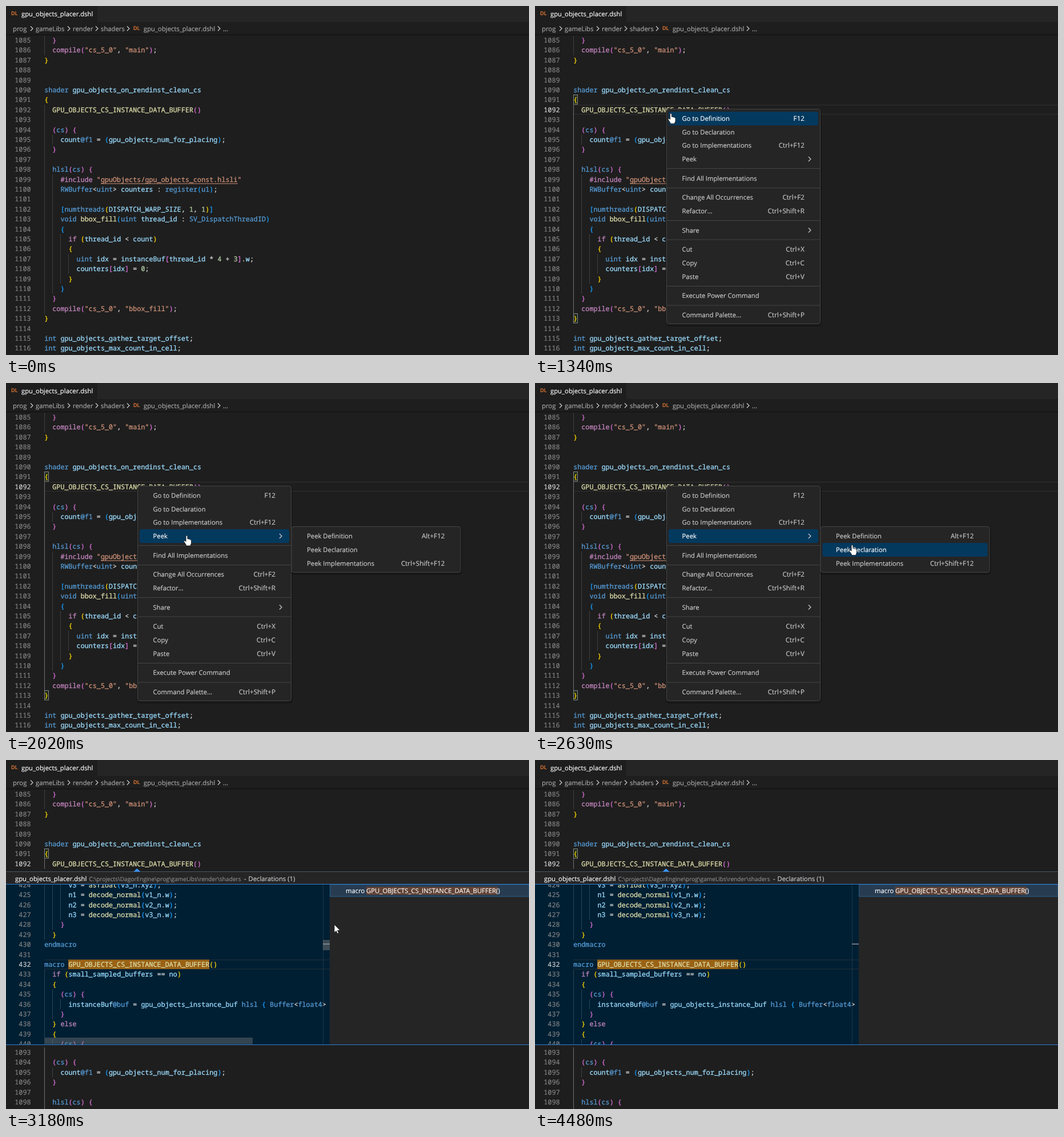
An HTML page that plays this animation: 916 by 611 pixels, repeating every 5210 ms.

```html
<!DOCTYPE html>
<html lang="en">
<head>
<meta charset="utf-8">
<title>Peek declaration</title>
<style>
  html, body { margin: 0; width: 100%; height: 100%; overflow: hidden; background: #1e1e1e; }
  svg { display: block; width: 100vw; height: 100vh; }
  text, tspan { fill: currentColor; stroke: currentColor; }
  text { white-space: pre; text-rendering: geometricPrecision; }
  .code { font: 11.757px "Noto Sans Mono", monospace; color: #d4d4d4; stroke-width: .3; }
  .ui { font: 11.3px "Open Sans", sans-serif; color: #ccc; stroke-width: .15; }
  .num { color: #858585; text-anchor: end; stroke-width: .15; }
  .key { font-size: 11.7px; text-anchor: end; }
  .white { color: #fff; }
  .crumb { color: #a9a9a9; }
  .path { font-size: 10.14px; color: #8f8f8f; }
  .lang { font-size: 9px; font-weight: 600; color: #e37933; }
  .symbol { font-size: 11.33px; color: #fff; }
  .chev { fill: none; stroke: #ccc; stroke-width: 1.2; }
  .guide { shape-rendering: crispEdges; }
</style>
</head>
<body>
<svg id="stage" viewBox="0 0 916 611"></svg>
<script>
const LOOP = 5210, TICK = 67.4;
const CHAR = 7.054, ROW = 17.4, LEFT = 67.2;

const main = `  }
  compile("cs_5_0", "main");
}


shader gpu_objects_on_rendinst_clean_cs
{
  GPU_OBJECTS_CS_INSTANCE_DATA_BUFFER()

  (cs) {
    count@f1 = (gpu_objects_num_for_placing);
  }

  hlsl(cs) {
    #include "gpuObjects/gpu_objects_const.hlsli"
    RWBuffer<uint> counters : register(u1);

    [numthreads(DISPATCH_WARP_SIZE, 1, 1)]
    void bbox_fill(uint thread_id : SV_DispatchThreadID)
    {
      if (thread_id < count)
      {
        uint idx = instanceBuf[thread_id * 4 + 3].w;
        counters[idx] = 0;
      }
    }
  }
  compile("cs_5_0", "bbox_fill");
}

int gpu_objects_gather_target_offset;
int gpu_objects_max_count_in_cell;`;

const preview = `      v3 = asfloat(v3_n.xyz);
      n1 = decode_normal(v1_n.w);
      n2 = decode_normal(v2_n.w);
      n3 = decode_normal(v3_n.w);
    }
  }
endmacro

macro GPU_OBJECTS_CS_INSTANCE_DATA_BUFFER()
  if (small_sampled_buffers == no)
  {
    (cs) {
      instanceBuf@buf = gpu_objects_instance_buf hlsl { Buffer<float4> instanceBuf; }
    }
  } else
  {
    (cs) {`;

const types = new Set(("shader cs hlsl RWBuffer uint register u1 numthreads void " +
  "SV_DispatchThreadID int macro endmacro Buffer float4").split(" "));
const control = new Set(["if", "else", "compile"]);
const bracketColors = ["#ffd700", "#da70d6", "#179fff"];

const escape = s => s.replace(/&/g, "&amp;").replace(/</g, "&lt;");
const rect = (x, y, w, h, fill, more = "") =>
  `<rect x="${x}" y="${y}" width="${w}" height="${h}" fill="${fill}" ${more}/>`;
const label = (x, y, s, kind = "") => `<text class="ui ${kind}" x="${x}" y="${y + 4}">${escape(s)}</text>`;
const chevron = (x, y) => `<path class="chev" d="M${x - 2} ${y - 4}l4 4-4 4"/>`;
const group = (id, body) => `<g id="${id}">${body}</g>`;

function wordColor(word, next) {
  if (types.has(word)) return "#569cd6";
  if (control.has(word)) return "#c586c0";
  return next === "(" ? "#dcdcaa" : "#9cdcfe";
}

// Colours each line; bracket colours follow the nesting depth.
function highlight(source, depth) {
  const token = /"[^"]*"|#\w+|@\w+|[A-Za-z_]\w*|\d+|[()[\]{}]|[^\w"#@()[\]{}]+/g;
  return source.split("\n").map(line => line.replace(token, (s, at) => {
    let color = "#d4d4d4";
    if (s[0] === '"') color = "#ce9178";
    else if (s[0] === "#") color = "#c586c0";
    else if (s[0] === "@") color = "#569cd6";
    else if (/\d/.test(s[0])) color = "#b5cea8";
    else if (/\w/.test(s[0])) color = wordColor(s, line[at + s.length]);
    else if (/[([{]/.test(s)) color = bracketColors[depth++ % 3];
    else if (/[)\]}]/.test(s)) color = bracketColors[--depth % 3];
    return `<tspan color="${color}">${escape(s)}</tspan>`;
  }));
}

function rows(lines, first, y, prefix = "n") {
  return lines.map((line, i) => {
    const base = (y + i * ROW + 4).toFixed(1);
    return `<text class="code num" id="${prefix}${first + i}" x="43.5" y="${base}">${first + i}</text>` +
      `<text class="code" x="${LEFT}" y="${base}">${line}</text>`;
  }).join("");
}

// Indent guide at a column, over rows from..to counted from the row centred on y.
function guide(col, from, to, y, color = "#404040") {
  const x = Math.floor(LEFT + col * CHAR);
  return rect(x, y + (from - .5) * ROW, 1, (to - from + 1) * ROW, color, 'class="guide"');
}

const mainRows = highlight(main, 2);
const previewRows = highlight(preview, 2);

function header() {
  const crumbs = [[12, "prog"], [52, "gameLibs"], [117, "render"], [166, "shaders"],
    [241, "gpu_objects_placer.dshl"], [380, "..."]];
  return rect(0, 0, 916, 28, "#252526") + rect(0, 0, 160, 28, "#1e1e1e") +
    label(9, 12.3, "DL", "lang") + label(27, 13.5, "gpu_objects_placer.dshl", "white") +
    crumbs.map(([x, s]) => label(x, 39.5, s, "crumb")).join("") +
    [45, 110, 159, 214, 373].map(x => chevron(x, 39.5)).join("") + label(223, 38.3, "DL", "lang") +
    rect(0, 49, 916, 1, "#191919") + rect(0, 50, 916, 1, "#141414") + rect(0, 51, 916, 1, "#1a1a1a");
}

const menuItems = [
  [197, "Go to Definition", "F12"], [220.5, "Go to Declaration", ""],
  [244, "Go to Implementations", "Ctrl+F12"], [268, "Peek", ">"],
  [301.5, "Find All Implementations", ""],
  [335, "Change All Occurrences", "Ctrl+F2"], [359, "Refactor...", "Ctrl+Shift+R"],
  [392.5, "Share", ">"],
  [426, "Cut", "Ctrl+X"], [450, "Copy", "Ctrl+C"], [474, "Paste", "Ctrl+V"],
  [507, "Execute Power Command", ""], [541, "Command Palette...", "Ctrl+Shift+P"]];
const subItems = [
  [268, "Peek Definition", "Alt+F12"], [292, "Peek Declaration", ""],
  [315.5, "Peek Implementations", "Ctrl+Shift+F12"]];

function menu(id, x, y, w, h, items, separators = []) {
  const body = items.map(([cy, name, key]) =>
    `<g class="item">${label(x + 27.5, cy, name)}` +
    `${key === ">" ? chevron(x + 251, cy) : label(x + w - 28, cy, key, "key")}</g>`).join("");
  return group(id,
    rect(x - 1, y + 1, w + 3, h + 3, "#000", 'rx="6" opacity=".25"') +
    rect(x + .5, y + .5, w - 1, h - 1, "#252526", 'rx="4" stroke="#454545"') +
    separators.map(s => rect(x + 1, s, w - 2, 1, "#454545")).join("") +
    rect(x + 4, 0, w - 8, 24, "#04395e", 'class="pick" rx="3"') + body);
}

function peek() {
  const top = 358 - 8 * ROW, below = 512, blue = "#2f7fd6";
  return rect(0, 190.5, 916, 421, "#1e1e1e") +
    guide(0, 0, 6, below, "#707070") + guide(2, 2, 2, below) +
    rows(mainRows.slice(8, 14), 1093, below, "b") +
    rect(0, 195, 916, 23, "#252526") + rect(0, 195, 916, 1, "#4a5866") +
    '<path d="M223.5 195.5l6-5.5 6 5.5z" fill="#3794ff"/>' +
    label(16, 207.5, "gpu_objects_placer.dshl", "white") +
    label(145.5, 207.5, "C:\\projects\\DagorEngine\\prog\\gameLibs\\render\\shaders", "path") +
    label(417, 207.5, "-") + label(424.5, 207.5, "Declarations (1)") +
    rect(0, 217, 567, 281, "#001f33") + rect(567, 217, 349, 281, "#252526") +
    `<g clip-path="url(#pane)">` +
      rect(67, 349.5, 500, 1, "#26323a") + rect(67, 365.5, 500, 1, "#26323a") +
      [[0, 0, 5], [2, 0, 4], [4, 0, 3], [0, 9, 16], [2, 11, 13], [4, 12, 12], [2, 16, 16]]
        .map(g => guide(...g, top, "#2c4350")).join("") +
      rect(109, 349.5, 247, 16.5, "#996214") +
      rows(previewRows, 424, top, "p") +
      rect(555, 218, 1, 280, "#1c374a") +
      group("bars", rect(68, 486, 364, 11.5, "#797979", 'opacity=".42"') +
        rect(555, 315, 12, 18, "#797979", 'opacity=".5"')) +
      rect(555, 321.5, 12, 1.5, "#8b969c") + "</g>" +
    rect(567.5, 218, 348.5, 21, "#283c51", 'stroke="#24618f"') +
    rect(631, 222, 230, 14, "#614336") +
    label(595, 229, "macro", "white") +
    label(631, 229, "GPU_OBJECTS_CS_INSTANCE_DATA_BUFFER()", "symbol") +
    rect(0, 217, 916, 1, blue) + rect(0, 498, 916, 1, blue);
}

const bracketBox = y => rect(67.5, y, 7, 16.5, "#1d2a1d", 'stroke="#888"');
const shape = (d, style) => `<path d="${d}" ${style}/>`;
const beamPath = "M-4-7.5h3l1 1 1-1h3M-4 7.5h3l1-1 1 1h3M0-6.5v13";
const arrowPath = "M0 0V14.3L3.3 11.3 5.5 16 7.7 15 5.5 10.3H10.1Z";
const handPath = "M-1.4 10.5V1.4a1.4 1.4 0 0 1 2.8 0V6q1.8-.8 2.4.6 1.8-.7 2.3.7 2-.3 2 1.4" +
  "V12.5q0 2-1.4 4V18H-1V16.5L-4.8 10.8q-.6-1.7.8-1.8 1 0 2.6 1.5z";
const solid = 'fill="#fff" stroke="#000" stroke-width=".7"';

document.getElementById("stage").innerHTML =
  '<defs><clipPath id="pane"><rect y="218" width="567" height="280"/></clipPath></defs>' +
  rect(0, 0, 916, 611, "#1e1e1e") +
  group("line", rect(67, 173, 849, 1, "#303030") + rect(67, 189, 849, 1, "#303030")) +
  [[0, 0, 1], [0, 7, 27], [2, 10, 10], [2, 14, 25], [4, 20, 24], [6, 22, 23]]
    .map(g => guide(...g, 60)).join("") +
  group("active", guide(0, 7, 27, 60, "#707070")) +
  group("boxes", bracketBox(155.5) + bracketBox(538.5)) +
  rows(mainRows, 1085, 60) +
  rect(166, 310.5, 240, 1, "#ce9178") +
  group("caret", rect(228.5, 173, 1.8, 17, "#d0d0d0")) +
  group("peek", peek()) + header() +
  menu("menu", 230, 180, 270, 377, menuItems, [284, 318, 375, 408.5, 490, 523.5]) +
  menu("sub", 499.5, 251, 297, 81, subItems) +
  group("cursor",
    group("beam", shape(beamPath, 'fill="none" stroke="#111" stroke-width="2.6"') +
      shape(beamPath, 'fill="none" stroke="#fff" stroke-width="1.2"')) +
    group("arrow", shape(arrowPath, solid)) +
    group("hand", shape(handPath, solid)));

const el = id => document.getElementById(id);
const show = (id, on) => { el(id).style.display = on ? "" : "none"; };

// Pointer path: tick, x, y
const path = [[1, 521, 477], [2, 441, 396], [3, 379, 333], [4, 332, 286], [5, 297, 250],
  [6, 272, 225], [8, 246, 199], [9, 240, 190], [12, 232, 180.5], [15, 232, 180.5],
  [16, 231, 180], [19, 231, 180], [20, 238, 188], [23, 272, 245], [26, 284, 258],
  [28, 292, 262], [30, 316.5, 267], [32, 380, 269], [35, 497, 275], [38, 549, 282],
  [42, 575, 288], [51, 575, 288], [52, 577, 298], [54, 591, 379], [58, 622, 587]];

function pointer(n) {
  const i = path.findIndex(p => p[0] >= n);
  if (i < 0) return path[path.length - 1].slice(1);
  if (i === 0) return path[0].slice(1);
  const [a, ax, ay] = path[i - 1], [b, bx, by] = path[i];
  const k = (n - a) / (b - a);
  return [ax + (bx - ax) * k, ay + (by - ay) * k];
}

function pick(id, items, index) {
  const bar = document.querySelector(`#${id} .pick`);
  bar.style.display = index < 0 ? "none" : "";
  if (index >= 0) bar.setAttribute("y", items[index][0] - 12);
  document.querySelectorAll(`#${id} .item`).forEach((item, i) => {
    for (const t of item.querySelectorAll("text")) t.classList.toggle("white", i === index);
  });
}

const rowAt = (items, y) => items.findIndex(item => Math.abs(item[0] - y) <= 12);

function draw(n) {
  const [x, y] = pointer(n);
  const menuOpen = n >= 16 && n < 45, subOpen = n >= 29 && n < 45, peekOpen = n >= 47;
  const inSub = subOpen && x > 500;

  show("line", n >= 16 && !peekOpen);
  show("active", n >= 17);
  show("boxes", n >= 17);
  show("caret", n >= 45 && !peekOpen);
  show("menu", menuOpen);
  show("sub", subOpen);
  show("peek", peekOpen);
  el("n1092").style.color = n >= 16 ? "#d6d6d6" : "";
  el("p432").style.color = "#d6d6d6";
  el("bars").style.opacity = Math.max(0, Math.min(1, (60 - n) / 6));

  pick("menu", menuItems, n < 20 ? -1 : inSub ? 3 : rowAt(menuItems, y));
  pick("sub", subItems, inSub ? rowAt(subItems, y) : -1);

  const kind = n < 16 ? "beam" : n >= 20 && n < 45 ? "hand" : "arrow";
  for (const id of ["beam", "arrow", "hand"]) show(id, id === kind);
  show("cursor", n >= 1 && n < 59);
  el("cursor").setAttribute("transform", `translate(${x} ${y})`);
}

let last = -1;
const start = performance.now();
function frame() {
  const t = (performance.now() - start) % LOOP;
  const n = Math.floor((t + 14) / TICK);
  if (n !== last) draw(last = n);
  requestAnimationFrame(frame);
}
frame();
</script>
</body>
</html>
```
